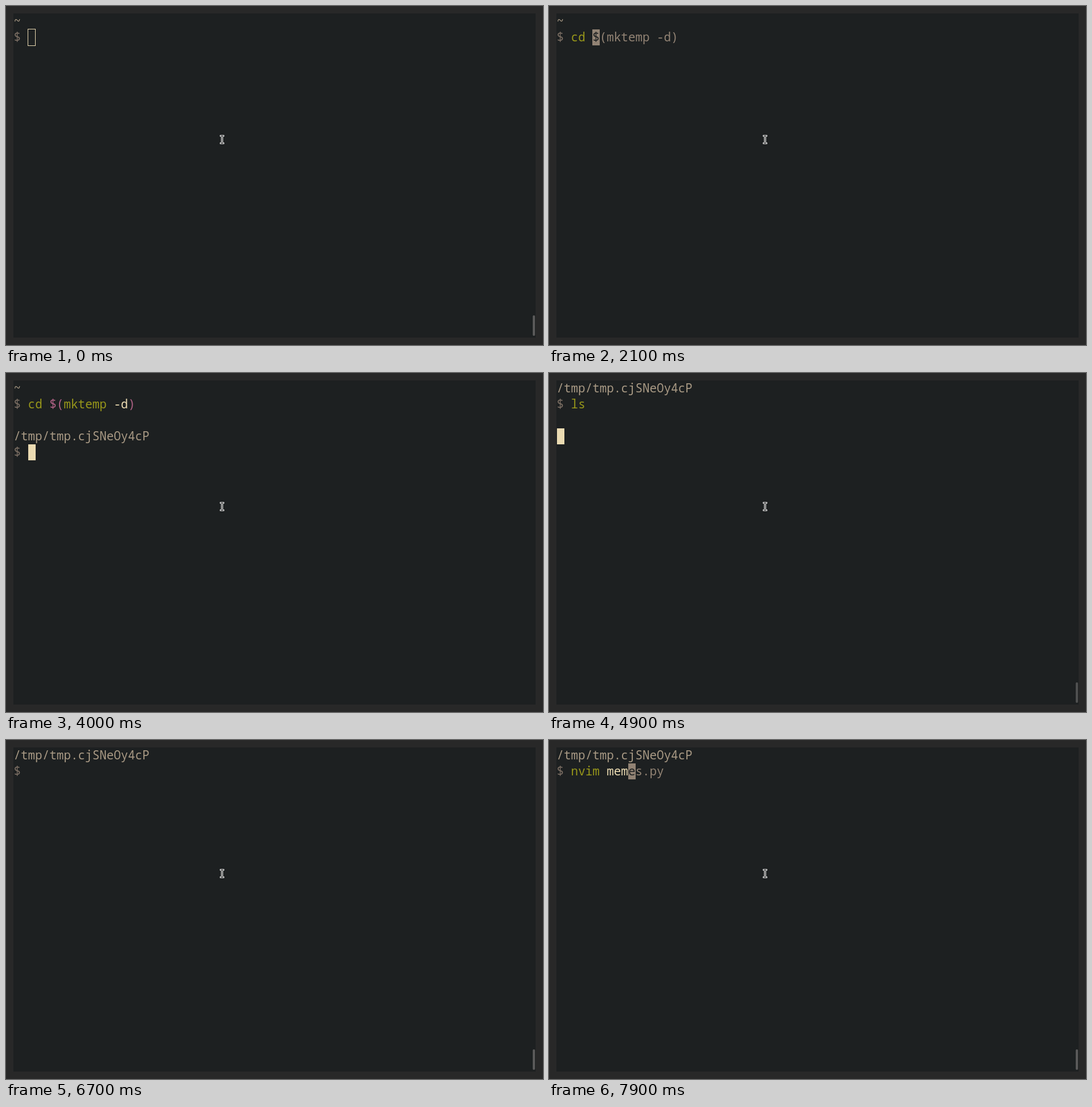
An HTML page for the animation above (8 s loop, 942 px wide and 594 px high).

```html
<!DOCTYPE html>
<html lang="en">
<head>
<meta charset="utf-8">
<title>Terminal session</title>
<style>
  html, body { margin: 0; width: 100%; height: 100%; overflow: hidden; background: #282828; }
  #stage { position: relative; width: 942px; height: 594px; overflow: hidden; background: #282828; }
  #stage > * { position: absolute; }
  #pane { left: 13px; top: 13px; width: 916px; height: 568px; background: #1d2021; }
  #text {
    left: 13.5px; top: 12px; margin: 0; color: #ebdbb2;
    font: 300 20.9px/28px "Noto Sans Mono", "DejaVu Sans Mono", monospace;
    font-variant-ligatures: none;
  }
  #text i { font-style: normal; }
  .path { color: #a89984; }
  .sign { color: #7c6f64; }
  .cmd { color: #98971a; }
  .bad { color: #cc241d; }
  .sub { color: #b16286; }
  .ghost { color: #928374; }
  .under { color: #1d2021; }
  #cursor { width: 12.5px; height: 28px; box-sizing: border-box; background: #ebdbb2; }
  #cursor.dim { background: #928374; }
  #cursor.hollow { width: 14px; height: 30px; margin: -1px 0 0 -1px; background: none; border: 1px solid #ebdbb2; }
  #bar { left: 924px; top: 542px; width: 4px; height: 36px; border-radius: 2px; background: #5a5a5a; }
  svg { left: 372px; top: 224px; }
</style>
</head>
<body>
<div id="stage">
  <div id="pane"></div>
  <div id="cursor"></div>
  <pre id="text"></pre>
  <div id="bar"></div>
  <svg width="14" height="20" fill="none" stroke-linecap="square">
    <path id="beam" d="M5 3.5H9M7 3.5V16.5M5 16.5H9" stroke="#e8e8e8" stroke-width="3"/>
    <use href="#beam"/>
    <path d="M5 3.5H9M7 3.5V16.5M5 16.5H9" stroke="#111"/>
  </svg>
</div>
<script>
const LOOP = 8000, FRAME = 100, CELL = 12.54, ROW = 28, ORIGIN = 13;
const $ = id => document.getElementById(id);
const tint = (name, text) => `<i class="${name}">${text}</i>`;
const cmd = text => tint('cmd', text);
const bad = text => tint('bad', text);
// Suggested text; its first letter sits under the block cursor.
const hint = text => tint('under', text[0]) + tint('ghost', text.slice(1));
const prompt = (path, line = '') => `${tint('path', path)}\n${tint('sign', '$')} ${line}`;

const HOME = '~', TEMP = '/tmp/tmp.cjSNeOy4cP';
const enterTemp = prompt(HOME, cmd('cd') + ' ' + tint('sub', '$(') + cmd('mktemp') + ' -d' + tint('sub', ')'));
const inTemp = enterTemp + '\n\n' + prompt(TEMP);
const listing = prompt(TEMP, cmd('ls'));
const listed = listing + '\n\n' + prompt(TEMP);
const edit = (typed, rest) => prompt(TEMP, cmd('nvim') + ' ' + typed + hint(rest));

// [start, screen, cursor column, cursor row, cursor style]
const steps = [
  [0, prompt(HOME), 2, 1, 'hollow'],
  [400, prompt(HOME), 2, 1],
  [1000, prompt(HOME)],
  [1600, prompt(HOME), 2, 1],
  [2000, prompt(HOME, cmd('cd') + hint(' $(mktemp -d)')), 4, 1, 'dim'],
  [2100, prompt(HOME, cmd('cd') + ' ' + hint('$(mktemp -d)')), 5, 1, 'dim'],
  [2600, enterTemp, 17, 1],
  [2900, inTemp, 2, 4],
  [3500, inTemp],
  [4000, inTemp, 2, 4],
  [4500, prompt(TEMP), 2, 1],
  [4700, prompt(TEMP, bad('l') + hint('s')), 3, 1, 'dim'],
  [4800, listing, 4, 1],
  [4900, listing, 0, 3],
  [5000, listed, 2, 4],
  [6000, listed],
  [6100, prompt(TEMP), 2, 1],
  [6700, prompt(TEMP)],
  [6900, prompt(TEMP, bad('n') + hint('vim test.py')), 3, 1, 'dim'],
  [7000, prompt(TEMP, bad('nv') + hint('im test.py')), 4, 1, 'dim'],
  [7100, prompt(TEMP, cmd('nvim') + hint(' test.py')), 6, 1, 'dim'],
  [7200, edit('', 'test.py'), 7, 1, 'dim'],
  [7700, edit('m', 'emes.py'), 8, 1, 'dim'],
  [7800, edit('me', 'mes.py'), 9, 1, 'dim'],
  [7900, edit('mem', 'es.py'), 10, 1, 'dim']
];

// Cubic ease-out fade lasting one second.
const fade = (time, start) => 1 - (1 - Math.min(1, Math.max(0, (time - start) / 1000))) ** 3;

function barOpacity(time) {
  if (time >= 1100 && time < 4500) return 0;
  return time < 1100 ? 1 - fade(time, 350) : fade(time, 4450);
}

let shown;
function draw(step) {
  const [, screen, column, row, style = ''] = step;
  const cursor = $('cursor');
  $('text').innerHTML = screen;
  cursor.hidden = column === undefined;
  cursor.className = style;
  if (!cursor.hidden) {
    cursor.style.left = Math.round(ORIGIN + 0.5 + column * CELL) + 'px';
    cursor.style.top = ORIGIN + row * ROW + 'px';
  }
  shown = step;
}

const began = performance.now();
function tick() {
  const time = Math.floor((performance.now() - began) % LOOP / FRAME) * FRAME;
  const step = steps.findLast(([start]) => start <= time);
  if (step !== shown) draw(step);
  $('bar').style.opacity = barOpacity(time);
  requestAnimationFrame(tick);
}
tick();
</script>
</body>
</html>
```
